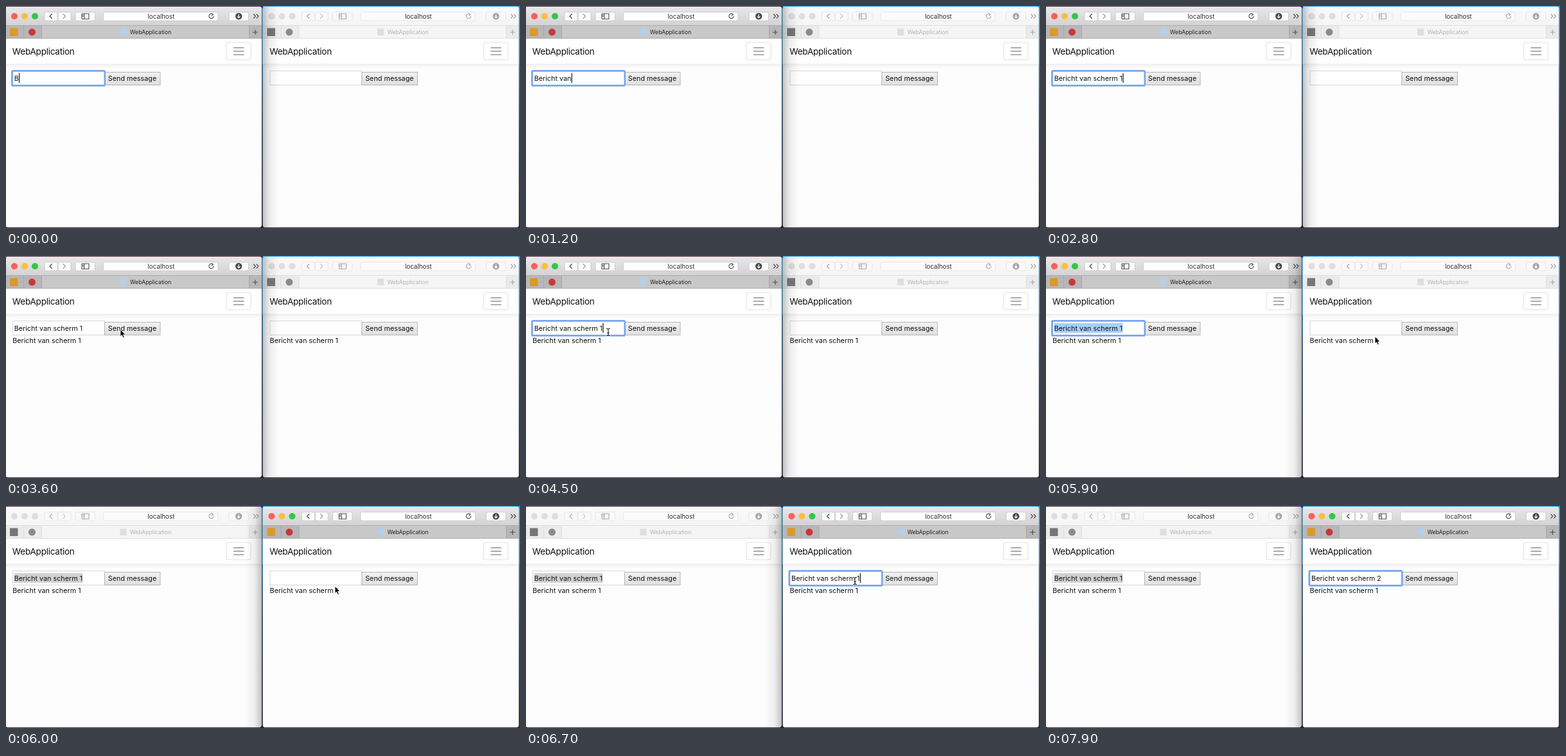
These frames come from a looping animation (800x347 px, 8000 ms). An HTML page:

```html
<!DOCTYPE html>
<html lang="nl">
<head>
<meta charset="utf-8">
<title>Two windows</title>
<style>
  html, body { margin: 0; width: 100%; height: 100%; overflow: hidden; background: #fff; }
  svg { display: block; width: 100vw; height: 100vh; }
  text { font-family: Inter, Roboto, "Liberation Sans", sans-serif; font-size: 10.8px; fill: #111; white-space: pre; }
  .window {
    --bar: #f5f5f5; --tab: #f5f5f5; --side: #ebebeb; --line: #dadada;
    --ink: #a6a6a6; --title: #b4b4b4; --btn: #f9f9f9; --btnline: #e4e4e4;
    --red: #dedede; --amber: #dedede; --green: #dedede;
    --pin1: #777; --pin2: #8a8a8a; --fav: #dcdfe2; --field: #d6d6d6; --ring: none; --mark: #d2d2d2; --url: #fbfbfb;
  }
  .window.active {
    --bar: #d3d1d3; --tab: #c9c8c9; --side: #b8b7b8; --line: #a5a4a5;
    --ink: #4a4a4a; --title: #222; --btn: #fbfbfb; --btnline: #c6c5c6;
    --red: #fc5f5b; --amber: #fdbd3f; --green: #34c749;
    --pin1: #d99a2b; --pin2: #c8373b; --fav: #b4d0ea; --mark: #abcdf8; --url: #fff;
  }
  .window.focus { --field: #c4c4c4; --ring: #77a5ee; }
  .stroke { fill: none; stroke: var(--ink); stroke-width: 1.1; stroke-linecap: round; stroke-linejoin: round; }
  .btn { fill: var(--btn); stroke: var(--btnline); stroke-width: .8; }
  .front .shade { display: none; }
</style>
</head>
<body>
<svg viewBox="0 0 800 347" preserveAspectRatio="none">
  <defs>
    <linearGradient id="desk" x2="0" y2="1">
      <stop stop-color="#1c9be0"/><stop offset=".2" stop-color="#2687c2"/>
      <stop offset=".55" stop-color="#32486f"/><stop offset="1" stop-color="#33243a"/>
    </linearGradient>
    <linearGradient id="gloss" x2="0" y2="1"><stop stop-color="#fff" stop-opacity=".5"/><stop offset="1" stop-color="#fff" stop-opacity="0"/></linearGradient>
    <linearGradient id="face" x2="0" y2="1"><stop stop-color="#f1f1f1"/><stop offset="1" stop-color="#dfdfdf"/></linearGradient>
    <linearGradient id="drop" x2="0" y2="1"><stop stop-opacity=".045"/><stop offset="1" stop-opacity="0"/></linearGradient>
    <linearGradient id="shadeL"><stop stop-opacity="0"/><stop offset=".6" stop-opacity=".07"/><stop offset="1" stop-opacity=".24"/></linearGradient>
    <linearGradient id="shadeR"><stop stop-opacity=".24"/><stop offset=".4" stop-opacity=".07"/><stop offset="1" stop-opacity="0"/></linearGradient>
    <clipPath id="frame"><rect x="-1" y="1" width="399" height="345" rx="4"/></clipPath>

    <g id="chrome">
      <rect x="-1" y="1" width="399" height="345" fill="#fdfdfd"/>
      <rect x="-1" y="1" width="399" height="30" style="fill:var(--bar)"/>
      <rect x="-1" y="1" width="399" height="30" fill="url(#gloss)"/>
      <circle cx="13" cy="16" r="5.1" style="fill:var(--red)"/>
      <circle cx="29" cy="16" r="5.1" style="fill:var(--amber)"/>
      <circle cx="45" cy="16" r="5.1" style="fill:var(--green)"/>
      <rect class="btn" x="60" y="9.5" width="20" height="13.5" rx="2.5"/>
      <rect class="btn" x="81" y="9.5" width="20" height="13.5" rx="2.5"/>
      <rect class="btn" x="108" y="9.5" width="30.5" height="13.5" rx="2.5"/>
      <rect class="btn" x="151.5" y="9.5" width="178.5" height="13.5" rx="2.5" style="fill:var(--url)"/>
      <rect class="btn" x="347" y="9.5" width="30.5" height="13.5" rx="2.5"/>
      <path class="stroke" d="M71.5 12.5 68 16l3.5 3.5M118 12h11v8.2h-11zM121.7 12v8.2M119.2 14.2h1.2M119.2 16.2h1.2"/>
      <path class="stroke" opacity=".55" d="M89 12.5 92.5 16 89 19.5"/>
      <path class="stroke" d="M322.3 13.2A3.7 3.7 0 1 0 323.3 16M320 11.5l2.5 1.7-2.3 1.8"/>
      <circle cx="362.2" cy="16" r="5.2" style="fill:var(--ink)"/>
      <path d="M362.2 13v5.5M360 16.5l2.2 2.2 2.2-2.2" fill="none" stroke="#fff" stroke-width="1.2"/>
      <path class="stroke" d="M385.5 13l3 3-3 3M390 13l3 3-3 3"/>
      <text x="220.5" y="19.7" style="font-size:9.8px;fill:#333">localhost</text>

      <rect x="-1" y="31" width="399" height="20" style="fill:var(--side)"/>
      <rect x="55.5" y="31" width="322.5" height="20" style="fill:var(--tab)"/>
      <path d="M-1 30.5H398M-1 50.5H398M27.5 31v19M55.5 31v19M378.5 31v19" fill="none" stroke-width=".8" style="stroke:var(--line)"/>
      <rect x="6" y="34.5" width="12.5" height="12.5" style="fill:var(--pin1)"/>
      <circle cx="40.5" cy="40.8" r="5.5" style="fill:var(--pin2)"/>
      <rect x="177.5" y="35.5" width="10" height="10.5" style="fill:var(--fav)"/>
      <text x="193" y="44" style="font-size:8.7px;fill:var(--title)">WebApplication</text>
      <path class="stroke" d="M384.5 41h7M388 37.5v7"/>

      <rect x="-1" y="51" width="399" height="40" fill="#fff"/>
      <path d="M-1 91H398" stroke="#e6e6e6" stroke-width=".9"/>
      <rect x="-1" y="91.5" width="399" height="6" fill="url(#drop)"/>
      <text x="9.8" y="75.5" style="font-size:13.6px;letter-spacing:-.27px">WebApplication</text>
      <rect x="343" y="57" width="38" height="27" rx="3" fill="#fff" stroke="#dedede"/>
      <path d="M354 65.3h16.5M354 70.7h16.5M354 76.1h16.5" stroke="#808080" stroke-width="1.3"/>

      <rect x="10.5" y="101.5" width="143" height="22" fill="#fff" style="stroke:var(--field)"/>
      <rect x="153.5" y="103.5" width="86.5" height="20" fill="url(#face)" stroke="#b5b5b5"/>
      <text x="158.8" y="117.3">Send message</text>
      <rect x="9.4" y="101.4" width="144.4" height="23" rx="1.5" fill="none" stroke-width="2.6" style="stroke:var(--ring)"/>
    </g>
  </defs>

  <rect width="800" height="347" fill="url(#desk)"/>
  <rect width="399" height="2" fill="#54344a"/>
  <rect x="397" width="3" height="347" opacity=".3"/>

  <g class="window" id="left">
    <g clip-path="url(#frame)">
      <use href="#chrome"/>
      <rect class="mark" x="12.5" y="105" width="107" height="15" style="fill:var(--mark)"/>
      <text class="entry" x="12.7" y="117.3"></text>
      <rect class="caret" y="105" width="1.1" height="15"/>
      <text class="message" x="10.2" y="136.3">Bericht van scherm 1</text>
      <rect class="shade" x="372" width="26" height="347" fill="url(#shadeL)"/>
    </g>
  </g>
  <g class="window" id="right" transform="translate(400.4)">
    <g clip-path="url(#frame)">
      <use href="#chrome"/>
      <rect class="mark" x="12.5" y="105" width="107" height="15" style="fill:var(--mark)"/>
      <text class="entry" x="12.7" y="117.3"></text>
      <rect class="caret" y="105" width="1.1" height="15"/>
      <text class="message" x="10.2" y="136.3">Bericht van scherm 1</text>
      <rect class="shade" x="-1" width="26" height="347" fill="url(#shadeR)"/>
    </g>
  </g>

  <path id="arrow" d="M0 0v11l2.5-2.3 1.9 4.2 1.9-.8-1.9-4.1h3.5z" stroke="#fff" stroke-width=".8"/>
  <g id="beam" fill="none" stroke-linecap="round">
    <path d="M-2.5-5.5Q0-5.5 0-4V4Q0 5.5-2.5 5.5M2.5-5.5Q0-5.5 0-4M0 4Q0 5.5 2.5 5.5" stroke="#fff" stroke-width="2.4"/>
    <path d="M-2.5-5.5Q0-5.5 0-4V4Q0 5.5-2.5 5.5M2.5-5.5Q0-5.5 0-4M0 4Q0 5.5 2.5 5.5M-1.3 1.5h2.6" stroke="#111" stroke-width="1.1"/>
  </g>
</svg>
<script>
const LOOP = 8000, BLINK = 500;
// Moments in ms: last key, click on the button, click back, select all,
// right window raised, then active, its field clicked, pasted, erased, retyped.
const TYPED = 2380, SEND = 3480, BACK = 4380, SELECT = 4790;
const RAISE = 5790, ACTIVE = 5990, FOCUS = 6390, PASTE = 6590, ERASE = 7190, RETYPE = 7390;
const phrase = 'Bericht van scherm 1';
const stem = phrase.slice(0, -1);
const $ = id => document.getElementById(id);
const show = (el, on) => { el.style.display = on ? '' : 'none'; };

const pane = id => {
  const root = $(id), part = name => root.querySelector('.' + name);
  return { root, mark: part('mark'), entry: part('entry'), caret: part('caret'), message: part('message') };
};
const left = pane('left'), right = pane('right');

// time, x, y
const path = [[2980, 128, 119], [3380, 178, 115], [3880, 178, 115], [4280, 128, 119],
              [5220, 128, 119], [5480, 605, 131], [5620, 605, 131],
              [5780, 512, 126], [5980, 512, 126], [6120, 512, 117], [6980, 512, 117]];

function pointerAt(t) {
  const i = path.findIndex(p => p[0] > t);
  if (i < 1) return null;
  const [t0, x0, y0] = path[i - 1], [t1, x1, y1] = path[i];
  const k = (t - t0) / (t1 - t0), e = k * k * (3 - 2 * k);
  return [x0 + (x1 - x0) * e, y0 + (y1 - y0) * e];
}

const overField = ([x, y]) => y > 101 && y < 124 && x % 400 > 10 && x % 400 < 153;

const leftText = t => t < TYPED ? stem.slice(0, Math.floor(t / 118) + 1) : phrase;
const rightText = t => t < PASTE ? '' : t < ERASE ? phrase : t < RETYPE ? stem : stem + '2';

// The caret stays lit while keys arrive, then blinks from the last event.
function caretOn(t) {
  const last = [RETYPE, ERASE, PASTE, FOCUS, BACK, TYPED].find(s => t >= s);
  return last === undefined || Math.floor((t - last) / BLINK) % 2 === 0;
}

function drawPane(p, { front, active, focus, text, selected, message, caret }) {
  p.root.classList.toggle('front', front);
  p.root.classList.toggle('active', active);
  p.root.classList.toggle('focus', focus);
  p.entry.textContent = text;
  p.caret.setAttribute('x', 13 + (text ? p.entry.getComputedTextLength() : 0));
  show(p.mark, selected);
  show(p.caret, focus && !selected && caret);
  show(p.message, message);
}

function place(el, pos) {
  show(el, !!pos);
  if (pos) el.setAttribute('transform', `translate(${pos[0]} ${pos[1]})`);
}

function draw(t) {
  const raised = t >= RAISE, active = t >= ACTIVE, message = t >= SEND, caret = caretOn(t);
  drawPane(left, {
    front: !raised, active: !active, focus: !active && (t < SEND || t >= BACK),
    text: leftText(t), selected: t >= SELECT, message, caret
  });
  drawPane(right, {
    front: raised, active, focus: t >= FOCUS,
    text: rightText(t), selected: false, message, caret
  });
  const pos = pointerAt(t), isBeam = pos && overField(pos);
  place($('beam'), isBeam ? pos : null);
  place($('arrow'), isBeam ? null : pos);
}

let start;
function tick(now) {
  start ??= now;
  draw((now - start) % LOOP);
  requestAnimationFrame(tick);
}
draw(0);
requestAnimationFrame(tick);
</script>
</body>
</html>
```
